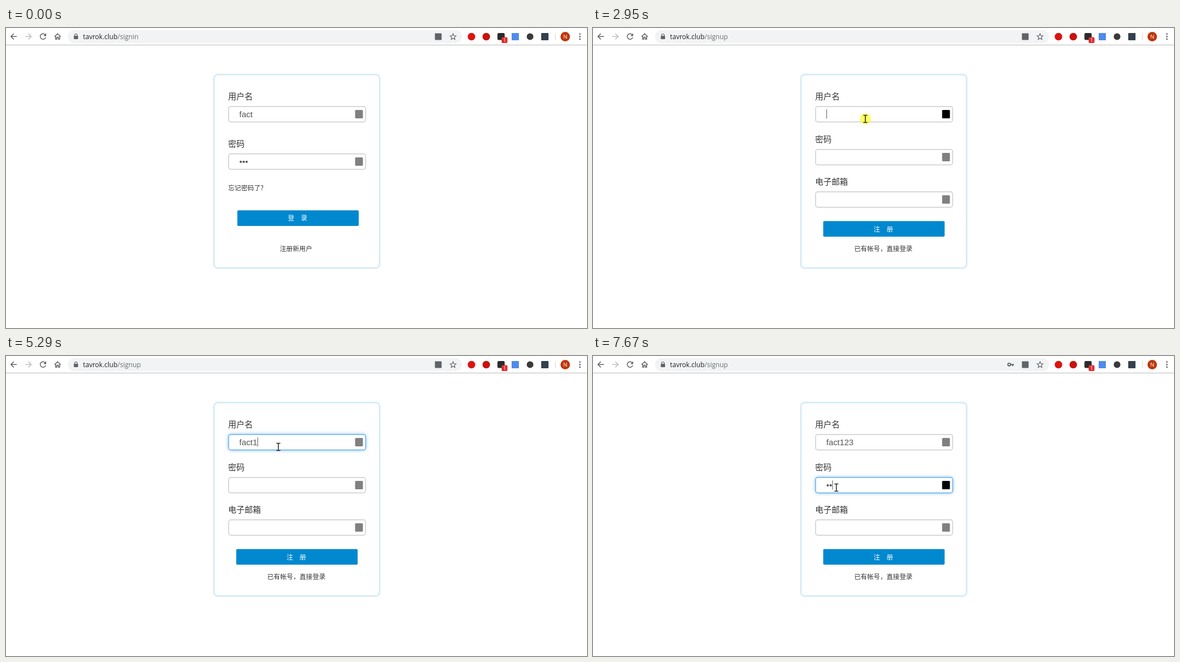
An HTML page that plays this animation: 1041 by 538 pixels, repeating every 8 s.

```html
<!DOCTYPE html>
<html lang="zh-CN">
<head>
<meta charset="utf-8">
<title>Sign up</title>
<style>
  html, body { margin: 0; width: 100%; height: 100%; overflow: hidden; background: #fff; }
  svg { display: block; width: 100%; height: 100%; }
  text { font-family: "Noto Sans CJK SC", "Noto Sans CJK", sans-serif; font-size: 11.6px; fill: #333; white-space: pre; }
  .ui, .ui text { font-family: "Open Sans", sans-serif; }
  .label { font-size: 14.7px; }
  .url { font-size: 12px; fill: #202124; }
  .path { fill: #6b6f73; }
  .line { fill: none; stroke: #5f6368; stroke-width: 1.5; }
  .gray { fill: #5f6368; }
  .button rect { fill: #0088cf; }
  .button text { fill: #fff; }
  .field .box { fill: #fff; stroke: #ccc; stroke-width: 1.5; }
  .field .icon { fill: #808080; }
  .field .value { font-family: "Liberation Sans", Arial, sans-serif; font-size: 14.9px; fill: #555; }
  .field .caret { stroke: #555; visibility: hidden; }
  .field.focus .box { stroke: #66afe9; filter: drop-shadow(0 0 3px rgba(102,175,233,.7)); }
  .field.hover .icon { fill: #000; }
  .field.typing .caret { visibility: visible; }
  .hover.link text { fill: #23627c; }
  .link path { stroke: #23627c; visibility: hidden; }
  .hover.link path { visibility: visible; }
  #menu { filter: drop-shadow(0 1px 2px rgba(0,0,0,.35)); }
  #items text { font-size: 11px; fill: #111; }
  .pointer path { fill: #fff; stroke: #222; stroke-width: 1; stroke-linejoin: round; }
</style>
</head>
<body>
<svg viewBox="0 0 1041 538" preserveAspectRatio="none">
  <g class="ui">
    <path d="M0 30.5H1041" stroke="#b9b9b9"/>
    <rect x="111" y="4" width="706" height="23" rx="11.5" fill="#f1f3f4"/>
    <path class="line" d="M19.5 15.2H9M14 10L8.8 15.2L14 20.4"/>
    <path class="line" d="M34.5 15.2H45M40 10L45.2 15.2L40 20.4" style="stroke:#bcbec0"/>
    <g id="reload">
      <path class="line" d="M70.3 12A5 5 0 1 0 71.2 16.6"/>
      <path class="gray" d="M72 9.5V14.5H67Z"/>
    </g>
    <path id="stop" class="line" d="M61.5 10.5L71 20M71 10.5L61.5 20"/>
    <path class="line" d="M87 15.5L92.5 10.3L98 15.5M88.8 14.5V20H91.2V16.5H93.8V20H96.2V14.5" stroke-width="1.3"/>
    <rect class="gray" x="121.5" y="14" width="7.6" height="6" rx="1"/>
    <path class="line" d="M123 14V12.8A2.3 2.3 0 0 1 127.6 12.8V14" style="stroke-width:1.2"/>
    <text class="url" x="138" y="19.7">tavrok.club<tspan id="path" class="path"></tspan></text>
    <g id="key">
      <circle class="line" cx="745.7" cy="15.3" r="2.4" style="stroke-width:1.9"/>
      <path class="line" d="M748 15.3H754M752 15.3V18" style="stroke-width:2.1"/>
    </g>
    <rect id="translate" class="gray" x="768.5" y="9.5" width="12" height="12" rx="1"/>
    <path class="line" d="M801 10.2L802.5 13.8L806.3 14.1L803.4 16.6L804.3 20.4L801 18.4L797.7 20.4L798.6 16.6L795.7 14.1L799.5 13.8Z" style="stroke-width:1.2"/>
    <circle cx="834" cy="15.5" r="6.8" fill="#dc1410"/>
    <circle cx="860.5" cy="15.5" r="6.8" fill="#c9120c"/>
    <rect x="880.5" y="9" width="13" height="12.5" rx="2.5" fill="#2b2b2b"/>
    <g id="badge">
      <rect x="888" y="16.5" width="10.5" height="10.5" rx="2" fill="#de2f2f"/>
      <text x="893.2" y="25" text-anchor="middle" style="font-size:8.5px;fill:#fff">1</text>
    </g>
    <rect x="906" y="9" width="13" height="13" rx="1" fill="#4f8bea"/>
    <circle cx="939" cy="15.5" r="6" fill="#3a3a3a"/>
    <rect x="959" y="9" width="13" height="13" rx="1" fill="#32414d"/>
    <path d="M984.5 9V22" stroke="#d4d6d8"/>
    <circle cx="1002" cy="15.5" r="8.5" fill="#bf360c"/>
    <text x="1002" y="19" text-anchor="middle" style="font-size:9.5px;fill:#fff">N</text>
    <g class="gray"><circle cx="1028.3" cy="10.8" r="1.4"/><circle cx="1028.3" cy="15.4" r="1.4"/><circle cx="1028.3" cy="20" r="1.4"/></g>
  </g>

  <rect x="372.5" y="83.5" width="297" height="347" rx="7" fill="#fff" stroke="#d8ecf7" stroke-width="3"/>
  <text class="label" x="398" y="127.5">用户名</text>

  <g id="signin">
    <g class="field" data-y="140"></g>
    <text class="label" x="398" y="212.5">密码</text>
    <g class="field" data-y="225"></g>
    <text x="398" y="291">忘记密码了?</text>
    <g class="button"><rect x="414.5" y="327" width="217.5" height="28" rx="2"/><text x="505" y="345.3">登　录</text></g>
    <g class="link" id="register"><text x="490.5" y="399.7">注册新用户</text><path d="M491 402H548.5"/></g>
  </g>

  <g id="signup">
    <g class="field" data-y="140"></g>
    <text class="label" x="398" y="204.5">密码</text>
    <g class="field" data-y="217"></g>
    <text class="label" x="398" y="280.5">电子邮箱</text>
    <g class="field" data-y="293"></g>
    <g class="button"><rect x="412.5" y="346.3" width="217.5" height="28" rx="2"/><text x="502.7" y="364.5">注　册</text></g>
    <text x="468" y="399.7">已有帐号，直接登录</text>
    <g id="menu" class="ui"><rect id="sheet" x="398" y="169.5" width="246.5" rx="1" fill="#fff"/><g id="items"></g></g>
  </g>

  <g id="status" class="ui">
    <path d="M-1 520.5H121Q124 520.5 124 523.5V539H-1Z" fill="#fff" stroke="#e4e4e4"/>
    <text x="-2.5" y="534" style="font-size:10.2px;fill:#666">https://tavrok.club/signup</text>
  </g>

  <g id="cursor">
    <circle id="click" r="10" fill="#ff0" opacity=".6"/>
    <g class="pointer" id="arrow"><path d="M.5 .5V13.2L3.4 10.5L5.4 15.3L7.5 14.4L5.5 9.7H9.5Z"/></g>
    <g class="pointer" id="hand"><path d="M-1 1.4Q.2 0 1.2 1.4V6L6 7Q8 7.6 7.8 10L7 13.5L6 17H-.3L-4.6 11.2Q-4.6 9.4-3 9.8L-1 11.4Z"/></g>
    <path id="beam" d="M-3.5-6.5H-1Q0-6.5 0-5.5Q0-6.5 1-6.5H3.5M0-5.5V5.5M-3.5 6.5H-1Q0 6.5 0 5.5Q0 6.5 1 6.5H3.5" fill="none" stroke="#222" stroke-width="1.5"/>
  </g>
</svg>
<script>
const $ = id => document.getElementById(id);
const show = (id, on) => { $(id).style.display = on ? '' : 'none'; };
const within = (t, from, to) => t >= from && t < to;

const fields = [...document.querySelectorAll('.field')];
for (const f of fields) {
  const y = +f.dataset.y;
  f.setAttribute('transform', `translate(398 ${y})`);
  f.innerHTML = `<rect class="box" x=".8" y=".8" width="245.6" height="27.6" rx="4"/>
    <rect class="icon" x="227.5" y="7" width="14" height="15" rx="1.5"/>
    <text class="value" x="20" y="19.6"></text>
    <path class="caret" d="M0 6V22.5"/>`;
}
const [oldName, oldPass, name, pass, mail] = fields;
const setValue = (f, value) => {
  const text = f.querySelector('.value');
  if (text.textContent === value) return;
  text.textContent = value;
  f.querySelector('.caret').setAttribute('transform', `translate(${20.7 + (value ? text.getComputedTextLength() : 0)} 0)`);
};
for (const f of fields) f.querySelector('.caret').setAttribute('transform', 'translate(20.7 0)');
setValue(oldName, 'fact');
setValue(oldPass, '•••');

const suggestions = ['fact', 'factfact', 'factqqqq', 'fern01', 'guest', 'moon'];
$('items').innerHTML = suggestions.map((s, i) =>
  `<text x="408" y="${193.3 + 29.7 * i}">${s}</text>`).join('');

// The picture is refreshed only at these moments: [first, last, count].
const moments = [[0, 0, 1], [210, 990, 11], [1070, 1320, 4], [1470, 1560, 2], [2020, 2020, 1],
  [2170, 2350, 3], [2490, 2720, 4], [2950, 3180, 4], [3490, 3490, 1], [3640, 3640, 1],
  [3810, 3900, 2], [4430, 4430, 1], [4740, 4740, 1], [5290, 5290, 1], [5600, 5600, 1],
  [5910, 5910, 1], [6440, 7210, 11], [7290, 7290, 1], [7670, 7670, 1]]
  .flatMap(([a, b, n]) => Array.from({ length: n }, (_, i) => a + (n > 1 ? (b - a) * i / (n - 1) : 0)));

const route = [[210, 790, 474], [600, 640, 330], [835, 484, 172], [990, 505, 223], [1140, 526, 381],
  [1240, 522, 394], [2490, 522, 394], [2720, 488, 163], [5910, 488, 163], [6440, 347, 158],
  [6594, 324, 170], [6902, 405, 222], [7056, 436, 236]];
const typedName = [[3640, 1], [3810, 2], [3900, 3], [4740, 4], [5290, 5], [5600, 6], [5910, 7]];
const typedPass = [[7290, 1], [7670, 2]];
const typed = (keys, t) => keys.reduce((n, [at, count]) => t >= at ? count : n, 0);

function position(t) {
  const next = route.findIndex(k => k[0] > t);
  if (next < 0) return route[route.length - 1].slice(1);
  const [t0, x0, y0] = route[Math.max(0, next - 1)], [t1, x1, y1] = route[next];
  const p = t1 > t0 ? (t - t0) / (t1 - t0) : 0;
  return [x0 + (x1 - x0) * p, y0 + (y1 - y0) * p];
}

function draw(t) {
  const joined = t >= 2490;
  show('signin', !joined);
  show('signup', joined);

  const loading = within(t, 2170, 2570);
  show('stop', loading);
  show('reload', !loading);
  show('translate', !within(t, 2260, 2640));
  show('badge', !within(t, 2260, 2350));
  show('key', t >= 7290);
  $('path').textContent = t >= 2260 ? '/signup' : '/signin';
  $('status').style.opacity = within(t, 1470, 1560) ? .5 : within(t, 1560, 2570) ? 1 : 0;

  const [x, y] = position(t);
  const over = fields.find(f => (f === mail || f === name || f === pass) === joined
    && within(x, 398, 645) && within(y, +f.dataset.y, +f.dataset.y + 29));
  const onLink = !joined && within(x, 491, 549) && within(y, 388, 404);
  const onHand = onLink || within(t, 2490, 2560);
  show('cursor', t >= 210);
  $('cursor').setAttribute('transform', `translate(${x} ${y})`);
  show('beam', over);
  show('hand', onHand);
  show('arrow', !over && !onHand);
  show('click', within(t, 2020, 2170) || within(t, 2950, 3180) || within(t, 7050, 7210));
  $('register').classList.toggle('hover', onLink);

  for (const f of fields) f.classList.toggle('hover', f === over && !(f === name && t >= 3640));
  name.classList.toggle('focus', within(t, 3020, 7130));
  pass.classList.toggle('focus', t >= 7130);
  name.classList.toggle('typing', within(t, 2950, 3490) || within(t, 3640, 4430) || within(t, 4740, 6440));
  pass.classList.toggle('typing', t >= 7050);

  const count = typed(typedName, t);
  setValue(name, 'fact123'.slice(0, count));
  setValue(pass, '•'.repeat(typed(typedPass, t)));

  const rows = count === 0 ? 6 : count === 1 ? 4 : 3;
  show('menu', within(t, 3100, 5290));
  $('sheet').setAttribute('height', 12.6 + 29.7 * rows);
  [...$('items').children].forEach((item, i) => { item.style.display = i < rows ? '' : 'none'; });
}

let last = -1;
function tick() {
  const now = performance.now() % 8000;
  const t = moments.filter(m => m <= now).pop();
  if (t !== last) draw(last = t);
  requestAnimationFrame(tick);
}
tick();
</script>
</body>
</html>
```
